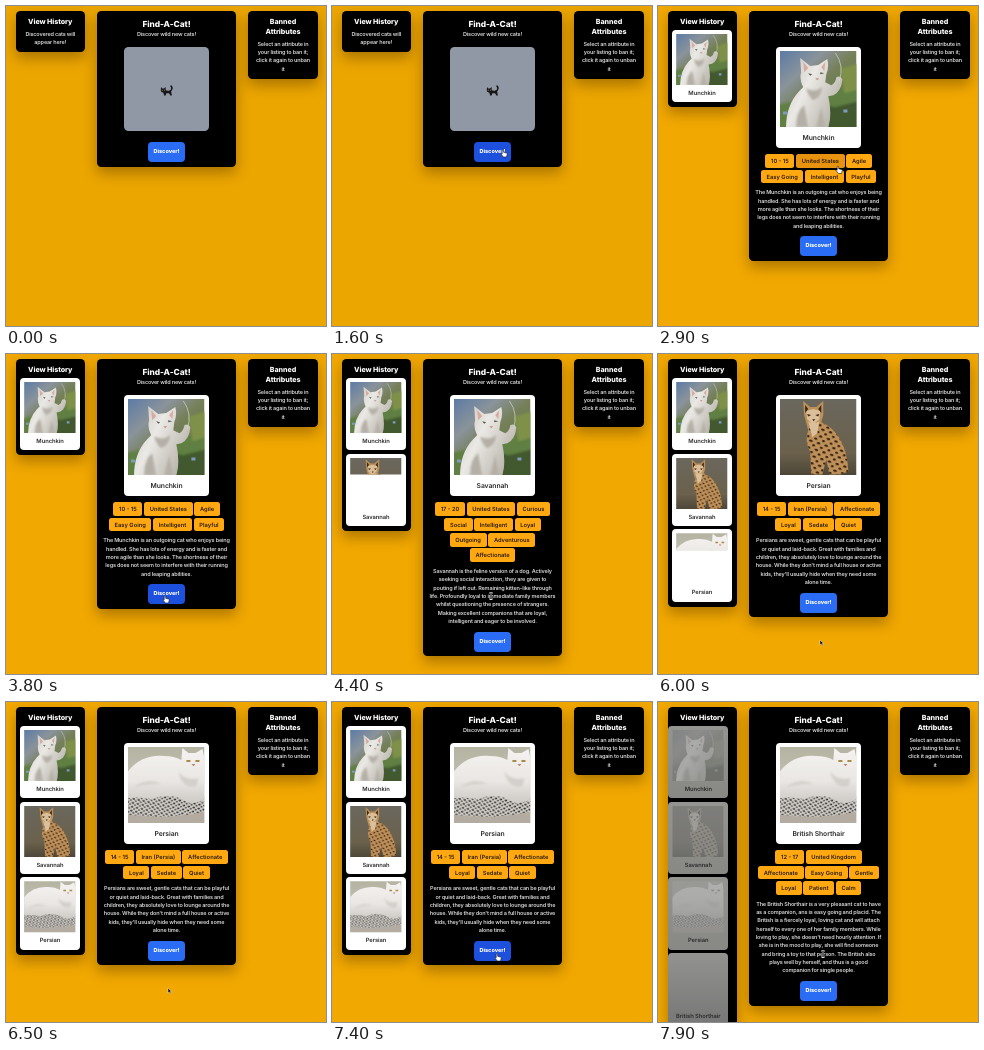
An HTML page that plays this animation: 320x320 px, repeating every 8 s.

```html
<!DOCTYPE html>
<html lang="en">
<head>
<meta charset="utf-8">
<title>Find-A-Cat!</title>
<style>
html, body { margin: 0; width: 100%; height: 100%; overflow: hidden; }
body {
  position: relative; background: #eca600; color: #d6d6d6; text-align: center; white-space: nowrap;
  font: 600 5.5px/8.3px Inter, "Open Sans", sans-serif; letter-spacing: -.03em;
  text-rendering: geometricPrecision;
}
body.found { background: #f1a800; }
[hidden] { display: none !important; }
.panel {
  position: absolute; top: 5px; box-sizing: border-box; background: #000; border-radius: 4.5px;
  box-shadow: 0 6px 14px rgba(70, 40, 0, .4);
}
.panel h2 { margin: 0; padding-top: 5.7px; font-size: 7.1px; line-height: 10px; font-weight: 800; letter-spacing: -.01em; color: #fff; }
#history { left: 9.5px; width: 69.5px; padding-bottom: 5px; }
#banned { left: 242px; width: 70px; padding-bottom: 5px; }
#main { left: 91px; width: 139px; padding-bottom: 4.7px; }
#main h2 { padding-top: 8.5px; font-size: 8.4px; line-height: 11px; }
.hint { margin-top: 4px; }

.card { background: #fff; color: #2a2a2a; letter-spacing: -.01em; border-radius: 4px; position: relative; }
.card svg { position: absolute; }
.card span { position: absolute; left: 0; width: 100%; }
#history .card { width: 60px; height: 72.5px; margin: 3.2px 0 0 4.5px; font-size: 5.8px; }
#history .card svg { left: 4.2px; top: 4px; width: 51.6px; height: 51.6px; }
#history .card span { top: 60px; }
#history .card.dim { margin-left: .8px; background: linear-gradient(#949491, #888885); }
#history .card.dim:last-child { background: linear-gradient(#929290, #777); }
.dim svg { filter: grayscale(.8) brightness(.9); opacity: .4; }
#photo { width: 84.5px; height: 101px; margin: 8.2px auto 0; font-size: 6.8px; }
#photo svg { left: 4px; top: 4px; width: 76.5px; height: 76.5px; }
#photo span { top: 87px; }
#empty { display: block; width: 84.5px; height: 84.5px; margin: 8.2px auto 11px; background: #9097a5; border-radius: 4.5px; }

.row { display: flex; justify-content: center; gap: 1.6px; margin-top: 1.7px; }
.row:first-child { margin-top: 6.2px; }
.tag {
  padding: 0 5.7px; height: 13.7px; line-height: 15px; border-radius: 2.5px;
  background: #ffa812; color: #2b1c00; font-size: 5.75px; letter-spacing: 0;
}
.tag.hover { background: #e8930f; }
.desc { margin: 6.2px auto 5.5px; }
.go {
  width: 37.5px; height: 20px; margin: 0 auto; border-radius: 4px; background: #2a6df4; color: #fff;
  font-size: 5.5px; font-weight: 800; line-height: 20px; letter-spacing: 0;
}
.go.hover { background: #1d50dc; }
#cursor { position: absolute; left: 0; top: 0; width: 10px; height: 10px; overflow: visible; pointer-events: none; }
</style>
</head>
<body>
<svg width="0" height="0" style="position:absolute">
  <defs>
    <linearGradient id="meadow" x1="0" y1="0" x2=".8" y2=".9">
      <stop offset="0" stop-color="#5c7ba6"/><stop offset=".32" stop-color="#8a939a"/>
      <stop offset=".55" stop-color="#76805a"/><stop offset="1" stop-color="#56733a"/>
    </linearGradient>
    <linearGradient id="fur" x1="0" y1="0" x2="1" y2=".6">
      <stop offset="0" stop-color="#c3c0ba"/><stop offset=".45" stop-color="#ebe9e5"/><stop offset="1" stop-color="#b9b5ac"/>
    </linearGradient>
    <linearGradient id="studio" x1="0" y1="0" x2="0" y2="1">
      <stop offset="0" stop-color="#6a675d"/><stop offset=".7" stop-color="#6b614c"/><stop offset="1" stop-color="#4c4638"/>
    </linearGradient>
    <linearGradient id="wall" x1="0" y1="0" x2="0" y2="1">
      <stop offset="0" stop-color="#b5b4a2"/><stop offset="1" stop-color="#cfcdc8"/>
    </linearGradient>
    <linearGradient id="persian" x1="0" y1="0" x2="0" y2="1">
      <stop offset="0" stop-color="#f5f3f1"/><stop offset=".6" stop-color="#e9e6e3"/><stop offset="1" stop-color="#cdc9c5"/>
    </linearGradient>
    <pattern id="spots" width="8" height="7" patternUnits="userSpaceOnUse" patternTransform="rotate(18)">
      <ellipse cx="2" cy="2" rx="1.7" ry="1.1" fill="#35200f"/><ellipse cx="6" cy="5.4" rx="1.4" ry="1.1" fill="#35200f"/>
    </pattern>
    <pattern id="leopard" width="5" height="4" patternUnits="userSpaceOnUse" patternTransform="rotate(12)">
      <ellipse cx="1.4" cy="1.2" rx="1.3" ry=".9" fill="#333"/><ellipse cx="3.8" cy="3" rx="1" ry=".8" fill="#444"/>
    </pattern>
    <filter id="soft"><feGaussianBlur stdDeviation="1.2"/></filter>
  </defs>
  <symbol id="pic0" viewBox="0 0 76 76">
    <path fill="url(#meadow)" d="M0 0h76v76H0z"/>
    <g filter="url(#soft)">
      <path fill="#5f8042" d="M78 26v52H-2V54q16-6 30-2Q56 44 78 26z"/>
      <path fill="#43592f" d="M42 52l12 4 24-6v28H46z"/>
      <path fill="#7f9148" d="M60 18l18-6v26l-14 4z"/>
    </g>
    <path fill="#7f9ac0" d="M3 60h4v3H3zm10 6h4v3h-4zm-6 6h4v2H7zm56-14h4v3h-4z"/>
    <path fill="url(#fur)" d="M6 76q0-22 13-36l4-4q-4-8-2-15L20 7l10 8 8-1 9-6q2 8-1 15l-1 8 6 3q4-2 5-8 4-2 6 2-1 12-9 16l-5 1q4 18 0 31z"/>
    <path fill="#d9aaa0" d="M23 11l5 6-4 4zM45 11l-4 5 3 4z"/>
    <path fill="#b5b0a7" filter="url(#soft)" d="M26 37q8 5 16-1-1 10-9 13-5-4-7-12zM16 76q0-16 8-22l4 22zM36 76l5-20 4 20z"/>
    <path fill="#54584e" d="M28 22l4 1-2 1.500zM40 21l4 1-4 1z"/>
    <path fill="#c98f84" d="M35 27h4l-2 2z"/>
    <path fill="none" stroke="#d5d9d0" stroke-width=".7" d="M55 2q9 12 4 28"/>
  </symbol>
  <symbol id="pic1" viewBox="0 0 76 76">
    <path fill="url(#studio)" d="M0 0h76v76H0z"/>
    <path fill="#bd8f59" d="M24 16l-1-14 7 6h6l7-6v14l-2 7q9 3 17 14 9 14 10 35l-8 3H49l-3-15-4 15H31l-1-22q-6-12-2-22z"/>
    <path fill="url(#spots)" d="M29 25l12-2q9 3 17 14 9 14 10 35l-8 3H49l-3-15-4 15H31l-1-22q-6-12-1-27z"/>
    <path fill="#d9c09a" d="M26 12l7-2 7 2-1 8-6 5-6-5zM28 22q5 4 11 0l-2 12-5 4z"/>
    <path fill="#3a2614" d="M25 6l3 4-3 4zM41 6l-3 4 3 4zM27 15l4 1-3 1.500zM39 15l-4 1 3 1.500zM32 20h3l-1.500 2z"/>
  </symbol>
  <symbol id="pic2" viewBox="0 0 76 76">
    <path fill="url(#wall)" d="M0 0h76v76H0z"/>
    <path fill="#b5aca1" d="M0 64h76v12H0z"/>
    <path fill="#cfcbc5" d="M0 49q38-10 76 0v15q-38 9-76 3z"/>
    <path fill="url(#leopard)" d="M0 49q38-10 76 0v15q-38 9-76 3z"/>
    <path fill="url(#persian)" d="M0 51V24Q14 7 36 9q10 0 17 4l1-12 6 5h7l7-4 2 10v40q-14 8-24-1-14-5-28 1-12-3-24-1z"/>
    <path fill="#d3cfcb" filter="url(#soft)" d="M50 24q6 10 20 7l-2 8q-14 3-18-15zM6 40q14-10 28-3-14-1-28 3z"/>
    <path fill="#aa8b48" d="M58 13h4v2h-4zm9 0h4v2h-4z"/>
    <path fill="#b9857c" d="M63 17h4l-2 2z"/>
  </symbol>
  <symbol id="hand" overflow="visible">
    <path fill="#fff" stroke="#111" stroke-width=".6" d="M-.8 0q.8-.8 1.500 0v2.300l3 .8q.7.300.5 1.200L3.500 7H.3L-2 4q.3-.9 1.200-.2z"/>
  </symbol>
  <symbol id="arrow" overflow="visible">
    <path fill="#111" stroke="#fff" stroke-width=".4" d="M0 0v5l1.200-1 .9 1.800.9-.5-.9-1.700h1.500z"/>
  </symbol>
  <symbol id="beam" overflow="visible">
    <path fill="none" stroke="#fff" stroke-width="1.800" d="M-1.500-3Q0-3 0-2V2Q0 3-1.500 3M1.500-3Q0-3 0-2V2Q0 3 1.500 3"/>
    <path fill="none" stroke="#111" stroke-width=".8" d="M-1.500-3Q0-3 0-2V2Q0 3-1.500 3M1.500-3Q0-3 0-2V2Q0 3 1.500 3"/>
  </symbol>
</svg>

<div class="panel" id="history">
  <h2>View History</h2>
  <div class="hint">Discovered cats will<br>appear here!</div>
</div>
<div class="panel" id="main">
  <h2>Find-A-Cat!</h2>
  <div>Discover wild new cats!</div>
  <svg id="empty" viewBox="0 0 84.500 84.500">
    <path fill="#17171a" d="M37 40l1.300 1.400h1.800L41.500 40l.4 3.500 3 .2q2.500-.6 2.300-2.800l-1-1.600q.4-1.500 1.700-.6 1.700 2 .2 4.200l-1 1.700.8 4h-1.600l-1.300-2.400h-2.600l-.8 2.400H40l-.6-2.800q-3-.6-2.600-3z"/>
    <path fill="#d9b64a" d="M37.800 42.700h.9v.7h-.9zm2.100 0h.9v.7h-.9z"/>
  </svg>
  <div class="card" id="photo" hidden><svg><use></use></svg><span></span></div>
  <div id="facts"></div>
  <div class="go">Discover!</div>
</div>
<div class="panel" id="banned">
  <h2>Banned<br>Attributes</h2>
  <div class="hint">Select an attribute in<br>your listing to ban it;<br>click it again to unban<br>it</div>
</div>
<svg id="cursor"><use></use></svg>

<script>
const LOOP = 8000;
const NEVER = Infinity;

// found: text appears; loaded: picture arrives
const cats = [
  { name: "Munchkin", found: 2100, loaded: 2300,
    tags: "10 - 15,United States,Agile|Easy Going,Intelligent,Playful",
    text: "The Munchkin is an outgoing cat who enjoys being|handled. She has lots of energy and is faster and|more agile than she looks. The shortness of their|legs does not seem to interfere with their running|and leaping abilities." },
  { name: "Savannah", found: 4200, loaded: 4700,
    tags: "17 - 20,United States,Curious|Social,Intelligent,Loyal|Outgoing,Adventurous|Affectionate",
    text: "Savannah is the feline version of a dog. Actively|seeking social interaction, they are given to|pouting if left out. Remaining kitten-like through|life. Profoundly loyal to immediate family members|whilst questioning the presence of strangers.|Making excellent companions that are loyal,|intelligent and eager to be involved." },
  { name: "Persian", found: 5800, loaded: 6200,
    tags: "14 - 15,Iran (Persia),Affectionate|Loyal,Sedate,Quiet",
    text: "Persians are sweet, gentle cats that can be playful|or quiet and laid-back. Great with families and|children, they absolutely love to lounge around the|house. While they don't mind a full house or active|kids, they'll usually hide when they need some|alone time." },
  { name: "British Shorthair", found: 7600, loaded: NEVER,
    tags: "12 - 17,United Kingdom|Affectionate,Easy Going,Gentle|Loyal,Patient,Calm",
    text: "The British Shorthair is a very pleasant cat to have|as a companion, ans is easy going and placid. The|British is a fiercely loyal, loving cat and will attach|herself to every one of her family members. While|loving to play, she doesn't need hourly attention. If|she is in the mood to play, she will find someone|and bring a toy to that person. The British also|plays well by herself, and thus is a good|companion for single people." }
];
const DIM_AT = 7800;

// time, x, y
const path = [
  [400, 204, 162], [600, 171, 144], [1900, 171, 144], [2500, 180, 160.5], [3000, 180, 160.5],
  [3400, 159, 242], [4500, 159, 242], [5000, 162, 286], [6600, 162, 286], [7100, 165, 252], [LOOP, 165, 252]
];

const $ = s => document.querySelector(s);
const photo = $("#photo"), cursor = $("#cursor");

function add(parent, cls, html) {
  const el = document.createElement("div");
  el.className = cls;
  el.innerHTML = html;
  parent.append(el);
  return el;
}

cats.forEach((cat, i) => {
  const rows = cat.tags.split("|").map(row =>
    `<div class="row">${row.split(",").map(t => `<div class="tag">${t}</div>`).join("")}</div>`).join("");
  cat.facts = add($("#facts"), "", rows + `<div class="desc">${cat.text.replaceAll("|", "<br>")}</div>`);
  cat.card = add($("#history"), "card", `<svg><use href="#pic${i}"></use></svg><span>${cat.name}</span>`);
  cat.pic = cat.card.querySelector("svg");
});

const last = (key, t) => cats.filter(c => c[key] <= t).length - 1;

function showCats(t) {
  const now = last("found", t), pic = last("loaded", t);
  document.body.classList.toggle("found", now >= 0);
  $("#history .hint").hidden = now >= 0;
  $("#empty").toggleAttribute("hidden", now >= 0);
  photo.hidden = now < 0;
  if (now >= 0) photo.querySelector("span").textContent = cats[now].name;
  photo.querySelector("use").setAttribute("href", pic < 0 ? "" : "#pic" + pic);
  cats.forEach((cat, i) => {
    cat.facts.hidden = i !== now;
    cat.card.hidden = i > now;
    cat.card.classList.toggle("dim", t >= DIM_AT);
    const partial = t >= Math.max(cat.found + 100, cat.loaded - 400);
    const hide = t >= cat.loaded ? 0 : partial ? 67 : 100;
    cat.pic.style.clipPath = `inset(0 0 ${hide}% 0)`;
  });
}

function moveCursor(t) {
  document.querySelectorAll(".hover").forEach(el => el.classList.remove("hover"));
  const visible = t >= path[0][0];
  cursor.style.visibility = visible ? "visible" : "hidden";
  if (!visible) return;
  const k = path.findIndex(p => p[0] > t);
  const [t0, x0, y0] = path[k - 1], [t1, x1, y1] = path[k];
  const u = (t - t0) / (t1 - t0), e = u * u * (3 - 2 * u);
  const x = x0 + (x1 - x0) * e, y = y0 + (y1 - y0) * e;
  const under = document.elementFromPoint(x, y);
  const target = under && under.closest(".go, .tag");
  if (target) target.classList.add("hover");
  const kind = target ? "hand" : under && under.closest(".desc") ? "beam" : "arrow";
  cursor.firstChild.setAttribute("href", "#" + kind);
  cursor.style.transform = `translate(${x}px, ${y}px)`;
}

function frame() {
  const t = performance.now() % LOOP;
  showCats(t);
  moveCursor(t);
  requestAnimationFrame(frame);
}
frame();
</script>
</body>
</html>
```
